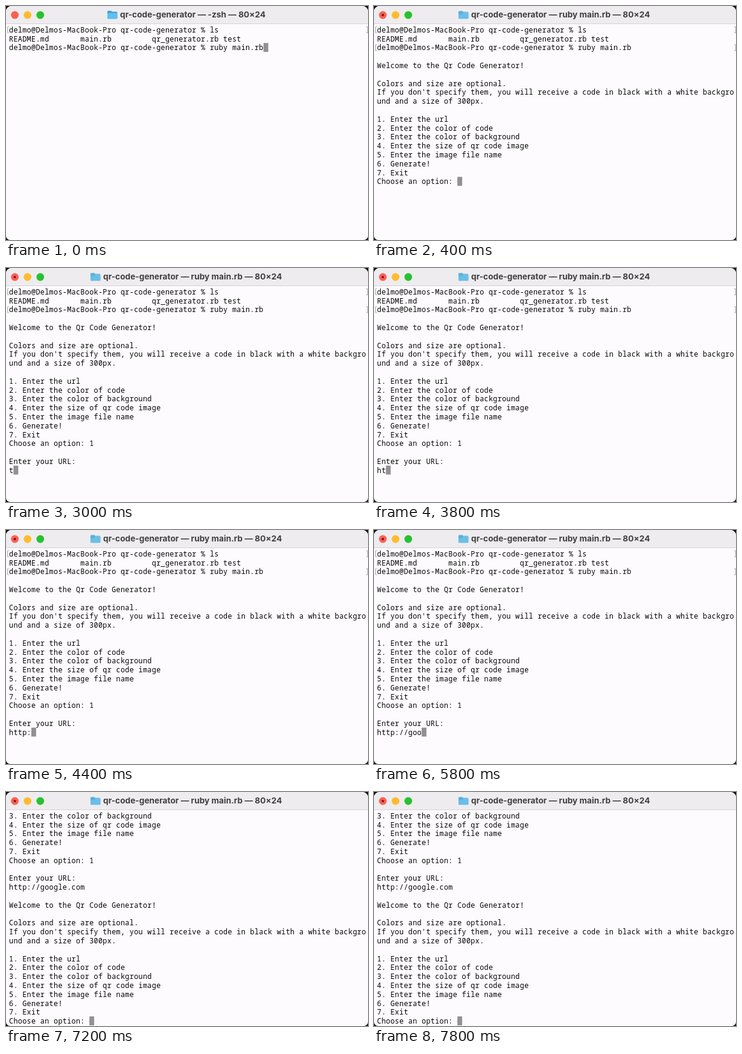
Recreate the animation shown at these times as an HTML page with a canvas. Size 600 px wide and 388 px high, loop 8000 ms.

```html
<!DOCTYPE html>
<html lang="en">
<head>
<meta charset="utf-8">
<title>Terminal session</title>
<style>
  html, body { margin: 0; width: 100%; height: 100%; overflow: hidden; background: #111; }
  canvas { display: block; width: 600px; height: 388px; }
</style>
</head>
<body>
<canvas id="stage"></canvas>
<script>
const W = 600, H = 388, LOOP = 8000;
const CELL = 7.4, ROW = 14.8, LEFT = 5, TOP = 32, ROWS = 24;

const canvas = document.getElementById('stage');
const ctx = canvas.getContext('2d');
const ratio = window.devicePixelRatio || 1;
canvas.width = W * ratio;
canvas.height = H * ratio;
ctx.scale(ratio, ratio);

const PROMPT = 'delmo@Delmos-MacBook-Pro qr-code-generator % ';
const SHELL = [
  PROMPT + 'ls',
  'README.md       main.rb         qr_generator.rb test',
  PROMPT + 'ruby main.rb'
];
const MENU = [
  '',
  'Welcome to the Qr Code Generator!',
  '',
  'Colors and size are optional.',
  "If you don't specify them, you will receive a code in black with a white backgro",
  'und and a size of 300px.',
  '',
  '1. Enter the url',
  '2. Enter the color of code',
  '3. Enter the color of background',
  '4. Enter the size of qr code image',
  '5. Enter the image file name',
  '6. Generate!',
  '7. Exit',
  'Choose an option: '
];

const START = 200, MENU_SHOWN = 400, OPTION_TYPED = 2200, OPTION_SENT = 2600, URL_SENT = 7200;
const URL = 'http://google.com';
// [time, characters of the URL visible]
const KEYS = [
  [3400, 0], [3600, 1], [3800, 2], [4000, 4], [4400, 5], [4600, 6], [4800, 7],
  [5400, 8], [5600, 9], [5800, 10], [6000, 11], [6200, 12], [6400, 13],
  [6600, 15], [6800, 17]
];

function typedUrl(t) {
  if (t < 3000) return '';
  if (t < KEYS[0][0]) return 't';
  const [, count] = KEYS.findLast(([time]) => t >= time);
  return URL.slice(0, count);
}

function screenLines(t) {
  if (t < START) return SHELL;
  if (t < MENU_SHOWN) return [...SHELL, ''];
  const lines = [...SHELL, ...MENU];
  if (t >= OPTION_TYPED) lines[lines.length - 1] += '1';
  if (t >= OPTION_SENT) lines.push('', 'Enter your URL:', typedUrl(t));
  if (t >= URL_SENT) lines.push(...MENU);
  return lines;
}

function disc(x, y, r, color) {
  ctx.fillStyle = color;
  ctx.beginPath();
  ctx.arc(x, y, r, 0, Math.PI * 2);
  ctx.fill();
}

function box(x, y, w, h, r, color) {
  ctx.fillStyle = color;
  ctx.beginPath();
  ctx.roundRect(x, y, w, h, r);
  ctx.fill();
}

function folder(x, faded) {
  ctx.save();
  ctx.globalAlpha = faded ? 0.6 : 1;
  box(x, 8, 7.5, 6, 1.5, '#3a9fd6');
  box(x, 9.5, 16.5, 11.5, 1.5, '#3a9fd6');
  box(x, 11.5, 16.5, 10, 1.5, '#5dc0ef');
  ctx.restore();
}

function titleBar(running) {
  ctx.fillStyle = '#eeecee';
  ctx.fillRect(0, 0, W, 30);
  ctx.fillStyle = '#d4d2d4';
  ctx.fillRect(0, 29, W, 1);
  ['#fe5f57', '#febc2e', '#28c131'].forEach((color, i) => disc(14.6 + i * 21.1, 15, 6.4, color));
  if (running) disc(14.6, 15, 2.1, '#8b0d08');

  const x = running ? 161 : 189;
  folder(x - 21, running);
  ctx.font = '700 13.7px Inter, sans-serif';
  ctx.letterSpacing = '0px';
  ctx.fillStyle = '#414041';
  ctx.fillText(`qr-code-generator — ${running ? 'ruby main.rb' : '-zsh'} — 80×24`, x, 19.3);
}

function bracket(x, top, dir) {
  ctx.strokeStyle = '#a9a8a9';
  ctx.lineWidth = 1;
  ctx.beginPath();
  ctx.moveTo(x + dir * 2.5, top + 2.5);
  ctx.lineTo(x, top + 2.5);
  ctx.lineTo(x, top + 12.5);
  ctx.lineTo(x + dir * 2.5, top + 12.5);
  ctx.stroke();
}

function terminal(lines) {
  const visible = lines.slice(-ROWS);
  const last = visible.length - 1;
  ctx.fillStyle = '#929192';
  ctx.fillRect(LEFT + visible[last].length * CELL, TOP + last * ROW - 0.3, CELL + 0.5, ROW);

  ctx.font = '500 11.8px "Noto Sans Mono", monospace';
  ctx.letterSpacing = '0.32px';
  visible.forEach((line, row) => {
    const top = TOP + row * ROW;
    ctx.fillStyle = '#050505';
    ctx.fillText(line, LEFT, top + 11.7);
    // A submitted prompt is marked at both margins.
    if (line.startsWith(PROMPT) && row < last) {
      bracket(2.5, top, 1);
      bracket(599.5, top, -1);
    }
  });
}

function draw(t) {
  ctx.fillStyle = '#111';
  ctx.fillRect(0, 0, W, H);
  ctx.save();
  ctx.beginPath();
  ctx.roundRect(0, 0, W, H, [9, 9, 7, 7]);
  ctx.clip();
  ctx.fillStyle = '#fdfbfd';
  ctx.fillRect(0, 0, W, H);
  titleBar(t >= MENU_SHOWN);
  terminal(screenLines(t));
  ctx.restore();
}

const begin = performance.now();
function tick() {
  draw((performance.now() - begin) % LOOP);
  requestAnimationFrame(tick);
}
tick();
</script>
</body>
</html>
```
